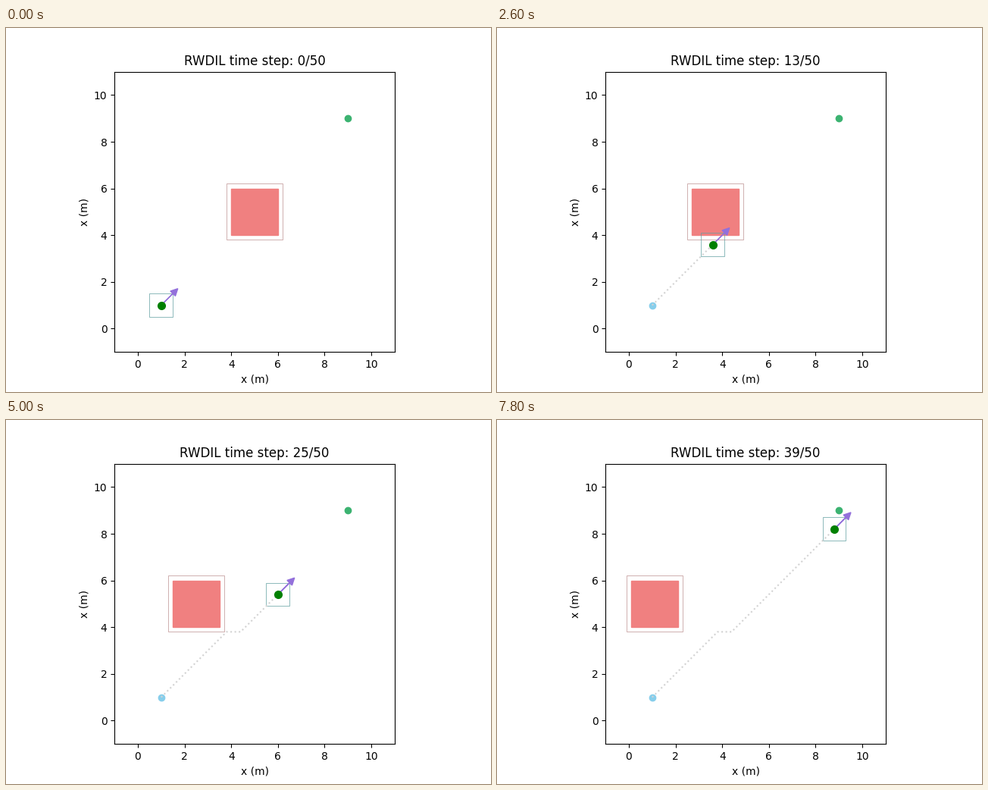
A matplotlib script that plays this animation: 640 by 480 pixels, repeating every 8000 ms.

```python
import matplotlib.pyplot as plt
import numpy as np
from matplotlib.animation import FuncAnimation
from matplotlib.patches import Rectangle

plt.rcParams["font.family"] = "DejaVu Sans"

STEPS, SHOWN, DT = 50, 40, 0.2
WAIT_FROM, WAIT_TO = 14, 17   # steps where the robot only moves sideways
GOAL = (9, 9)

# Path of the robot: unit speed per axis, sliding along the obstacle's lower edge
k = np.arange(SHOWN + 1)
vx = np.ones(SHOWN)
vy = np.where((k[:-1] >= WAIT_FROM) & (k[:-1] < WAIT_TO), 0.0, 1.0)
path_x = 1 + DT * np.concatenate(([0], np.cumsum(vx)))
path_y = 1 + DT * np.concatenate(([0], np.cumsum(vy)))

fig, ax = plt.subplots(figsize=(6.4, 4.8), dpi=100)


def square(cx, cy, half, **style):
    ax.add_patch(Rectangle((cx - half, cy - half), 2 * half, 2 * half, **style))


def draw(step):
    ax.clear()
    ax.set_aspect("equal")
    ax.set_xlim(-1, 11)
    ax.set_ylim(-1, 11)
    ax.set_xticks(range(0, 11, 2))
    ax.set_yticks(range(0, 11, 2))
    ax.set_xlabel("x (m)")
    ax.set_ylabel("x (m)")
    ax.set_title(f"RWDIL time step: {step}/{STEPS}")

    obstacle_x = 5 - 0.1 * step
    square(obstacle_x, 5, 1, color="lightcoral")
    square(obstacle_x, 5, 1.2, fill=False, ec="rosybrown", lw=0.5)

    x, y = path_x[step], path_y[step]
    square(x, y, 0.5, fill=False, ec="cadetblue", lw=0.5)
    ax.arrow(x, y, 0.5 * vx[step], 0.5 * vy[step],
             head_width=0.3, head_length=0.3, color="mediumpurple")

    ax.plot(1, 1, "o", color="skyblue")
    ax.plot(*GOAL, "o", color="mediumseagreen")
    ax.plot(path_x[:step + 1], path_y[:step + 1], ":", color="lightgray")
    ax.plot(x, y, "o", color="green", ms=7)
    return []


anim = FuncAnimation(fig, draw, frames=SHOWN, init_func=lambda: draw(0),
                     interval=200, repeat=True, repeat_delay=0)
plt.show()
```
